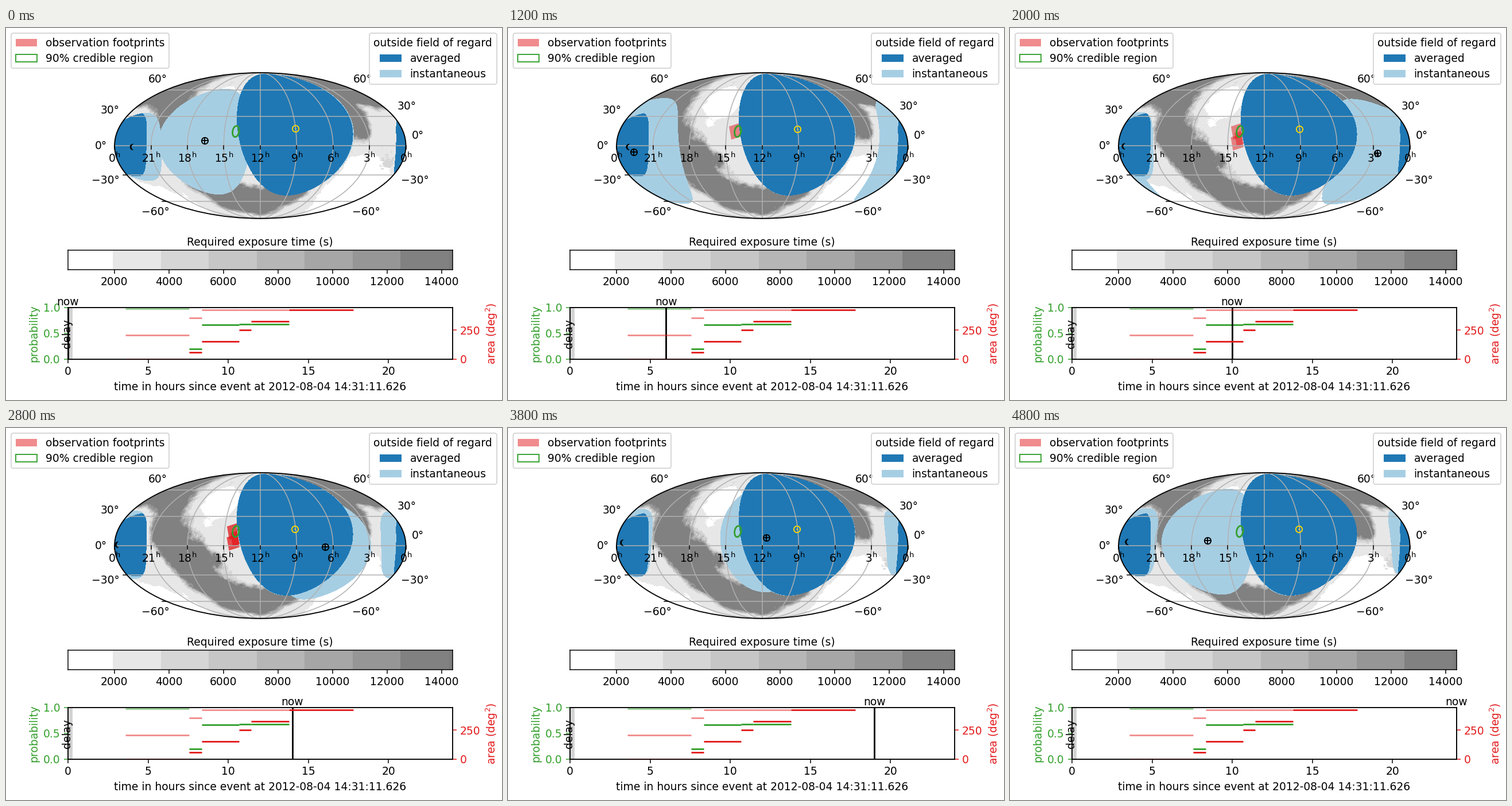
Animation of 864 by 648 pixels, one loop 5 s. Source, as a matplotlib script:

```python
import numpy as np
import matplotlib.pyplot as plt
from matplotlib.animation import FuncAnimation
from matplotlib.colors import to_rgba
from matplotlib.patches import Ellipse, Patch, Polygon

W, H, DPI = 864, 648, 135
CX, CY, RX, RY = 442.8, 204.85, 253.7, 126.9
HOURS = 25
LIGHT_BLUE, BLUE = "#a6cee3", "#1f78b4"
GREEN, RED = "#33a02c", "#e31a1c"
GREYS = np.array([255, 231, 214, 198, 182, 166, 150, 129, 125])

plt.rcParams.update({"font.family": "DejaVu Sans", "font.size": 10,
                     "xtick.major.pad": 3, "legend.labelspacing": 0.43})
fig = plt.figure(figsize=(W / DPI, H / DPI), dpi=DPI, facecolor="white")


def pixel_axes(left, top, right, bottom):
    return fig.add_axes([left / W, 1 - bottom / H, (right - left) / W, (bottom - top) / H])


# ---- sky geometry: longitude grows to the right, 12h in the middle ----
THETA = np.linspace(-np.pi / 2, np.pi / 2, 4001)
SIN_LAT = (2 * THETA + np.sin(2 * THETA)) / np.pi


def project(lon, lat):
    theta = np.interp(np.sin(np.radians(lat)), SIN_LAT, THETA)
    return CX + RX * np.cos(theta) * np.asarray(lon) / 180, CY - RY * np.sin(theta)


def unit(lon, lat):
    lon, lat = np.radians(lon), np.radians(lat)
    return np.array([np.cos(lat) * np.cos(lon), np.cos(lat) * np.sin(lon), np.sin(lat)])


X0, X1, Y0, Y1 = 188, 698, 77, 333
px, py = np.meshgrid(np.arange(X0, X1) + 0.5, np.arange(Y0, Y1) + 0.5)
grid_theta = np.arcsin(np.clip((CY - py) / RY, -1, 1))
grid_lat = np.degrees(np.arcsin((2 * grid_theta + np.sin(2 * grid_theta)) / np.pi))
grid_lon = (px - CX) / (RX * np.maximum(np.cos(grid_theta), 1e-3)) * 180
grid_vec = np.moveaxis(unit(grid_lon, grid_lat), 0, -1)


def separation(lon, lat):
    return np.degrees(np.arccos(np.clip(grid_vec @ unit(lon, lat), -1, 1)))


def sky_noise(seed):
    rng = np.random.default_rng(seed)
    total = np.zeros(px.shape)
    for octave in range(7):
        for _ in range(9):
            k = rng.normal(size=3)
            k *= 4 * 2 ** octave / np.linalg.norm(k)
            total += 2 ** (-0.45 * octave) * np.sin(grid_vec @ k + rng.uniform(0, 2 * np.pi))
    return total / total.std()


# clouds (positive) and clear windows (negative): lon, lat, radius, change
CLOUDS = [(130, 14, 16, 24), (149, 39, 10, -8), (170, 60, 22, 14), (-69, -6, 12, 11),
          (-52, -12, 10, 13), (-130, 12, 18, 11), (-103, 31, 14, -8), (-25, -40, 12, 4)]


def exposure_sky():
    gal = 90 - separation(-12.86, 27.13)
    ecl = 90 - separation(-90, 66.56)
    rough, mottle = sky_noise(4), sky_noise(9)
    half_width = 19 + 3.2 * rough
    for lon, lat, radius, change in CLOUDS:
        half_width += change * np.exp(-(separation(lon, lat) / radius) ** 2)
    level = 1.35 + 6.6 / (1 + np.exp((np.abs(gal) - half_width) / 1.9)) + 0.3 * mottle
    north = 17 - separation(-62, 46)
    south = np.minimum(-ecl - 29, -gal - 33)
    clear = np.maximum(north, south) + 3 * rough > 0
    level = np.clip(level.astype(int), 1, 7)
    level[clear & (level < 3)] = 0
    return np.repeat(GREYS[level][..., None], 3, axis=2).astype(np.uint8)


# ---- bodies seen from a geosynchronous orbit ----
def sun_at(t):
    return 44.8 - 0.04 * t, 17.0 - 0.011 * t


def earth_at(t):
    lon = (-68.9 - 15.05 * t + 180) % 360 - 180
    return lon, 8.3 * np.cos(np.radians(15.04 * (t + 3.5)))


def moon_at(t):
    x = 212.8 - 0.65 * t + 8.7 * np.sin(np.radians(104 - 15 * t))
    return (x - CX) / RX * 180, -1.4 + 0.207 * t + 0.11 * (earth_at(t)[1] - 4.9)


def blocked(t):
    return ((separation(*sun_at(t)) < 70) | (separation(*earth_at(t)) < 56.8)
            | (separation(*moon_at(t)) < 35))


instant = [blocked(t) for t in range(HOURS)]
averaged = np.all(instant, axis=0)


def region_image(t):
    image = np.zeros(px.shape + (4,))
    image[instant[t]] = to_rgba(LIGHT_BLUE)
    image[averaged] = to_rgba(BLUE)
    return image


# ---- sky map ----
sky = fig.add_axes([0, 0, 1, 1], zorder=-1)
sky.axis("off")
outline = Ellipse((CX, CY), 2 * RX, 2 * RY, fc="none", ec="black", lw=1, zorder=6)
sky.add_patch(outline)
box = dict(extent=(X0, X1, Y1, Y0), interpolation="nearest", aspect="auto")
regions = sky.imshow(region_image(0), zorder=3, **box)
for layer in (sky.imshow(exposure_sky(), zorder=1, **box), regions):
    layer.set_clip_path(outline)
sky.set(xlim=(0, W), ylim=(H, 0))

TILE = np.array([(-11, -8.5), (7.5, -14.5), (11, 8.5), (-7, 14.5)])
UPPER, LOWER, SIDE = (396, 180), (395.5, 199), (402, 191.5)
EDGES = [3.57, 7.57, 8.34, 10.69, 11.45, 13.79, 17.8]
footprints = []
for start, centre in zip(EDGES, [UPPER, LOWER, SIDE, UPPER, LOWER, SIDE]):
    tile = Polygon(TILE + centre, fc=RED, ec="none", alpha=0.5, zorder=2)
    footprints.append((start, sky.add_patch(tile)))

lats = np.linspace(-90, 90, 181)
for lon in range(-135, 180, 45):
    sky.plot(*project(np.full(181, lon), lats), color="#b0b0b0", lw=0.8, zorder=4)
for lat in (-60, -30, 0, 30, 60):
    sky.plot(*project(np.array([-180, 180]), np.full(2, lat)), color="#b0b0b0", lw=0.8, zorder=4)

for lon in range(-180, 181, 45):
    x, y = project(lon, 0)
    sky.plot([x, x], [y, y + 6.6], color="black", lw=0.8, zorder=5)
    hour = (12 - lon // 15) % 24
    sky.text(x, 233.5, rf"{hour}$\mathregular{{^h}}$", ha="center", va="baseline", zorder=7)
for lat in (-30, -60):
    x, y = project(-180, lat)
    sky.plot([x - 6.6, x], [y, y], color="black", lw=0.8, zorder=5)

for label, left, right in [("60°", (264, 88), (621, 88)), ("30°", (181, 142), (698, 135)),
                           ("0°", (165, 204), (717, 186)), ("−30°", (173, 264), (712, 264)),
                           ("−60°", (260, 319), (627, 319))]:
    for x, y in (left, right):
        sky.text(x + 0.5, y + 6.8, label, ha="center", va="baseline", zorder=7)

a = np.linspace(0, 2 * np.pi, 60)
sky.plot(400.3 + 5.6 * np.cos(a) - 1.1 * np.sin(a), 180.2 + 9.6 * np.sin(a),
         color=GREEN, lw=1.5, zorder=8)


def symbol(shapes, color):
    return [sky.plot([], [], ls="none", marker=m, ms=size, mec=color, mfc="none",
                     mew=1 if size > 3 else 0.6, zorder=9)[0] for m, size in shapes]


sun = symbol([("o", 6), ("o", 0.6)], "gold")
earth = symbol([("o", 6), ("+", 6)], "black")

arc = np.radians(np.linspace(80, 280, 40))
inner = np.linspace(-5.5, 5.5, 20)
CRESCENT = np.vstack([np.column_stack([5.6 * np.cos(arc), 5.6 * np.sin(arc)]),
                      np.column_stack([0.97 - 3.7 * (1 - (inner / 5.5) ** 2), inner])])
moon = sky.add_patch(Polygon(CRESCENT, fc="black", ec="none", zorder=9))
moon.set_clip_path(outline)

# ---- legends ----
fig.legend(handles=[Patch(fc=RED, ec="none", alpha=0.5, label="observation footprints"),
                    Patch(fc="none", ec=GREEN, lw=1, label="90% credible region")],
           loc="upper left")
fig.legend(handles=[Patch(fc=BLUE, ec="none", label="averaged"),
                    Patch(fc=LIGHT_BLUE, ec="none", label="instantaneous")],
           loc="upper right", title="outside field of regard")

# ---- exposure scale ----
bar = pixel_axes(108, 387, 777.6, 420.7)
steps = [300] + [1941 + 1760 * k for k in range(8)] + [14400]
for lo, hi, grey in zip(steps, steps[1:], GREYS):
    bar.axvspan(lo, hi, fc=str(grey / 255), ec="none")
bar.set(xlim=(300, 14400), xticks=range(2000, 14001, 2000), yticks=[])
sky.text(CX, 379, "Required exposure time (s)", ha="center", va="baseline")

# ---- timeline ----
prob = pixel_axes(108, 487, 777.6, 576.9)
area = prob.twinx()
starts, ends = EDGES[:-1], EDGES[1:]
prob.axvspan(0, 0.28, fc="lightgray", ec="none")
prob.hlines(0.98, starts[0], ends[0], color=GREEN, alpha=0.5)
prob.hlines([0, 0.196, 0.667, 0.673, 0.678], starts[:5], ends[:5], color=GREEN)
area.hlines([206, 354, 425, 425, 425], starts[:5], ends[:5], color=RED, alpha=0.5)
area.hlines([0, 60, 154, 250, 327, 425], starts, ends, color=RED)
prob.set(xlim=(0, 24), ylim=(0, 1), xticks=range(0, 21, 5), yticks=[0, 0.5, 1],
         xlabel="time in hours since event at 2012-08-04 14:31:11.626")
area.set(ylim=(0, 445), yticks=[0, 250])
prob.set_ylabel("probability", color=GREEN)
area.set_ylabel("area (deg$^2$)", color=RED)
prob.tick_params(axis="y", colors=GREEN)
area.tick_params(axis="y", colors=RED)
prob.text(0.28, 0.49, "delay", rotation=90, ha="right", va="center")
now_line = prob.axvline(0, color="black", lw=1.5)
now_text = prob.text(0, 1, "now", ha="center", va="bottom")


def draw(t):
    regions.set_data(region_image(t))
    for start, tile in footprints:
        tile.set_visible(t >= start)
    for marks, place in ((sun, sun_at(t)), (earth, earth_at(t))):
        x, y = project(*place)
        for mark in marks:
            mark.set_data([x], [y])
    moon.set_xy(CRESCENT + np.array(project(*moon_at(t))))
    now_line.set_xdata([t, t])
    now_text.set_x(t)
    return []


anim = FuncAnimation(fig, draw, frames=HOURS, interval=200, repeat=True, repeat_delay=0)
plt.show()
```
